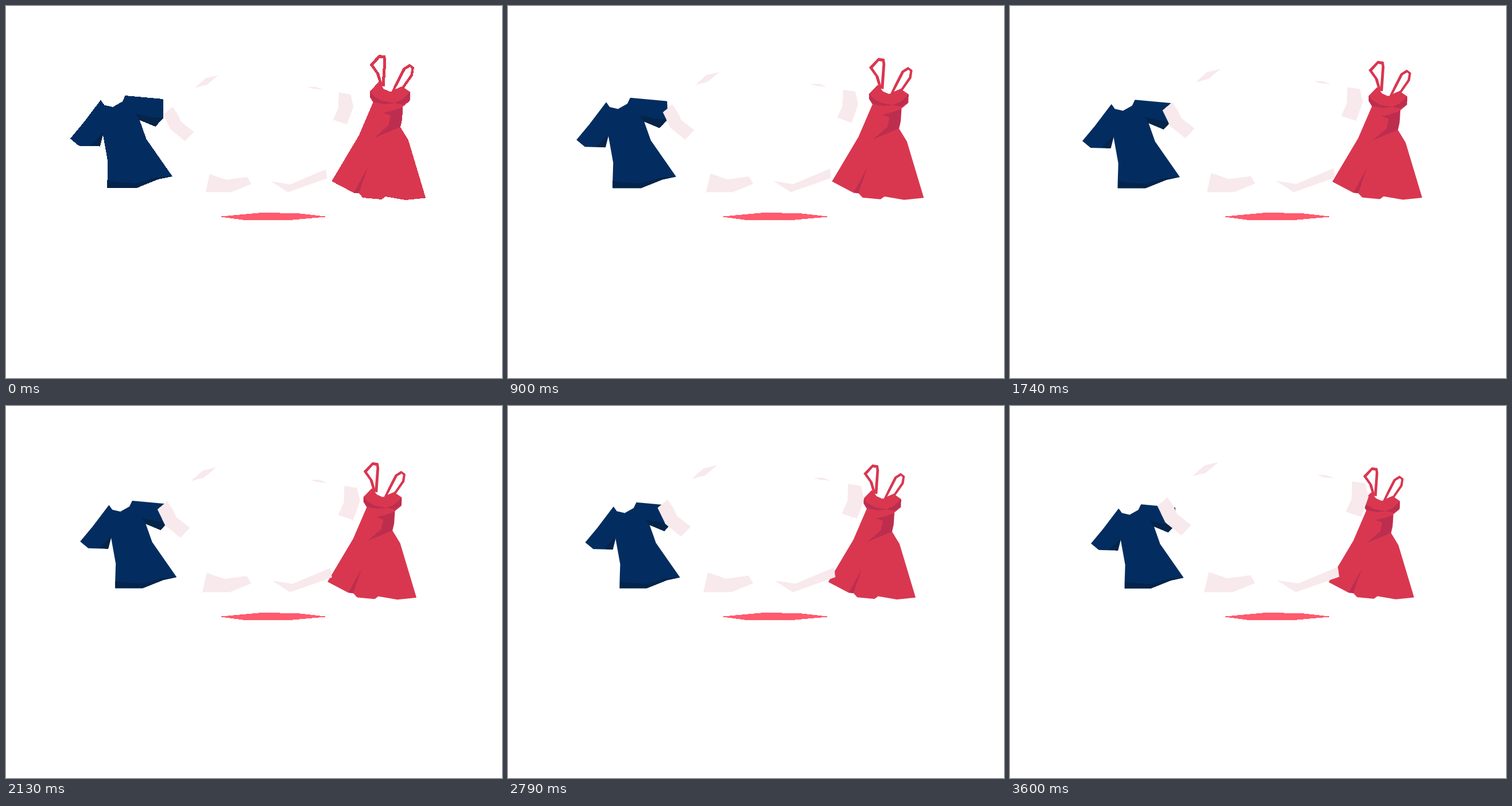
Animation, 864 px wide and 648 px high, one loop 3630 ms. Source, as an HTML page:

```html
<!DOCTYPE html>
<html lang="en">
<head>
<meta charset="utf-8">
<title>Clothes</title>
<style>
  html, body { margin: 0; width: 100%; height: 100%; overflow: hidden; background: #fff; }
  svg { display: block; width: 864px; height: 648px; shape-rendering: crispEdges; stroke-linejoin: round; }
  .navy { fill: #032d60; stroke: #032d60; }
  .navy-shade { fill: #04244a; }
  .red { fill: #d93750; stroke: #d93750; }
  .red-shade { fill: #bd2e4e; }
  .blush { fill: #f8e9ec; stroke: #f8e9ec; stroke-width: 0.6; }
  .coral { fill: #ff5a6e; stroke: #ff5a6e; }
</style>
</head>
<body>
<svg viewBox="0 0 864 648">
  <polygon class="coral" points="375,367 416,372.5 494,372.5 556,367 508,361.5 445,360.5"/>

  <g id="clothes">
    <!-- shirt -->
    <polygon class="navy" points="165,164.5 171,173 186,176.5 203,167 208,156.5 273,162.5 274,180 273,196 260,209.5 232,198 244,232 289,296.5 265,301.5 227,316.8 176.7,316.8 177,303 178,272 169,222 163.5,244 127,243 112.5,231 135,204"/>
    <polygon class="navy-shade" points="225,187 250,193 274,195 260,210 232,198"/>
    <polygon class="navy-shade" points="169,221 163.5,244.5 146,243.5"/>
    <polygon class="navy-shade" points="176.5,304 190,306 226,309 263,298 289,296.5 265,302 227,317 176.5,317"/>

    <!-- dress -->
    <path class="red" fill-rule="evenodd" d="M634,102 650,85.5 660.5,87 662,96 659,140 652,139 645.5,118Z M639.5,103 651,90 657.5,91 658,96 655,136 650,118Z"/>
    <path class="red" fill-rule="evenodd" d="M672,149 681,130 692,108.5 703,101.5 710.5,107 708.5,121 693,143 678,149Z M677,146 685,131 695.5,110.5 704,105.5 707,109 705,119.5 691,140Z"/>
    <polygon class="red" points="634,149 649,133.5 658,145 668,149.5 678,149 691,141.5 703.5,150 703,165 691,175 689.5,198 686.5,211 700.5,234 730.5,334 696,337.5 661,331.5 654,336.5 622,333.5 615,326 606,325 568,305 615,226 640,168 634,158"/>
    <polygon class="red-shade" points="634,149 642,158 655,165 670,168 679,169 660,171 641,167.5 634,158"/>
    <polygon class="red-shade" points="704,150 703,165 691,172 676,169 690,163"/>
    <polygon class="red-shade" points="691,176 689.5,198 686.5,211 641,230 666,208 670,191 657,186 674,182"/>
    <polygon class="red-shade" points="631,279 616,322 614,326 606,325"/>
  </g>

  <g id="accents" class="blush">
    <polygon points="330,142 348,126 369,121 350,137"/>
    <polygon points="526,141 539,141 550,145 535,144"/>
    <polygon points="290,176 299,189 305,202 327,219 312,235 287,215 274.5,189"/>
    <polygon points="580,151 600,154 605,175 594,206 570,198 579,178"/>
    <polygon points="355,293 384,303 420,298 427,310 392,324 348,324"/>
    <polygon points="463,306 495,311 557,285 559,300 491,324"/>
  </g>
</svg>
<script>
  const LOOP = 3630, STEP = 30;
  const clothes = document.getElementById("clothes");
  const accents = document.getElementById("accents");

  function zoom(group, scale) {
    group.setAttribute("transform", `translate(432 324) scale(${scale}) translate(-432 -324)`);
  }

  // Clothes shrink while the accents grow, both about the stage centre.
  function draw() {
    const step = Math.floor((performance.now() % LOOP) / STEP);
    const progress = step / (LOOP / STEP - 1);
    zoom(clothes, (1.1 - 0.1 * progress) / 1.1);
    zoom(accents, (0.9 + 0.1 * progress) / 0.9);
    requestAnimationFrame(draw);
  }
  draw();
</script>
</body>
</html>
```
